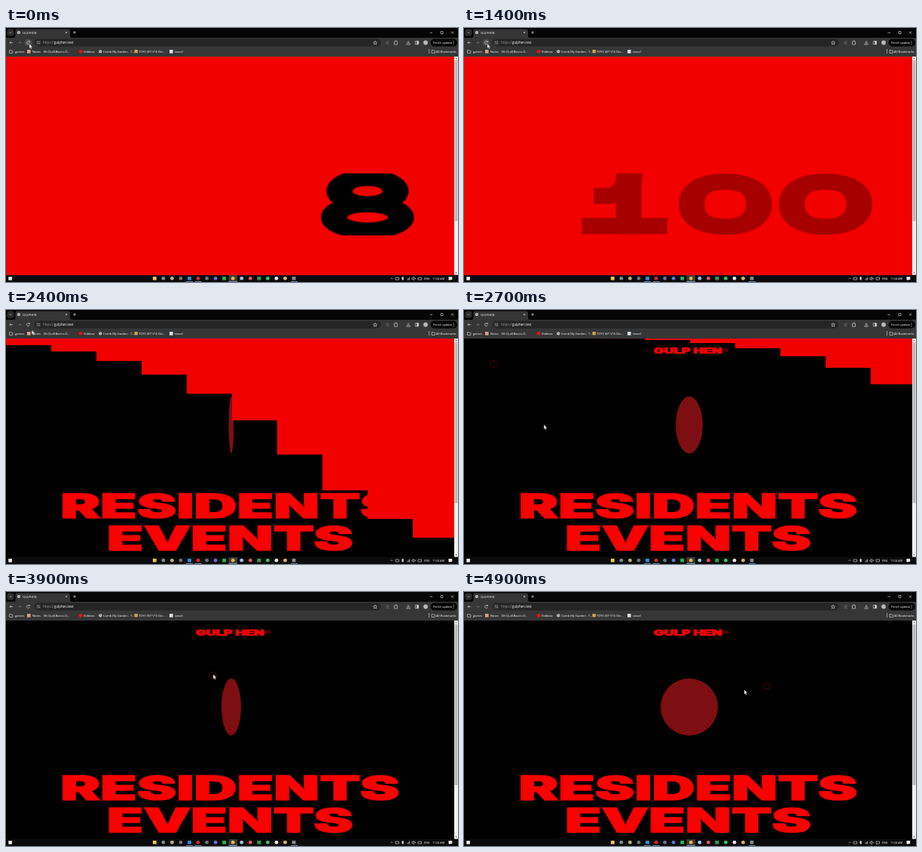
Write an HTML page that moves like this. It is 600 by 338 pixels and loops after 5000 ms.

```html
<!DOCTYPE html>
<html lang="en">
<head>
<meta charset="utf-8">
<title>GULPHEN</title>
<style>
  html, body { margin: 0; width: 100%; height: 100%; overflow: hidden; background: #000; }
  svg { display: block; width: 100vw; height: 100vh; }
  text { font-family: "Open Sans", "Noto Sans", sans-serif; font-size: 4px; fill: #fff; }
  .line { fill: none; stroke: #e4e4e4; stroke-width: .6; }
  .dim { stroke: #777; }

  .display text { font: 900 44.6px Inter, "Open Sans", sans-serif; fill: #fa0000; stroke: #fa0000; stroke-width: 1.2; text-anchor: middle; }
  .display .brand { font-size: 10.2px; stroke-width: .6; }
  .display .mark { font-size: 8px; font-weight: 400; fill: #b00000; stroke: none; }

  #count path { fill: none; stroke: #000; stroke-width: 21.5; clip-path: url(#digit); }

  .loop, #wipe rect { animation: 5s linear infinite both; }
  .cover { animation-name: cover; }
  @keyframes cover { 0%, 34.53% { visibility: visible; } 34.54%, 100% { visibility: hidden; } }

  .counter { animation-name: fade; }
  @keyframes fade {
    0%, 24% { opacity: 1; animation-timing-function: ease-out; }
    32%, 100% { opacity: 0; }
  }

  #wipe rect { animation-name: lift; fill: #f20000; shape-rendering: crispEdges; }
  @keyframes lift {
    0%, 34.54% { transform: scaleY(1); animation-timing-function: cubic-bezier(.5, 0, .3, 1); }
    51.2%, 100% { transform: scaleY(0); }
  }

  .hover { animation-name: hover; }
  @keyframes hover { 0%, 47% { opacity: 1; } 47.1%, 100% { opacity: 0; } }

  .pointer { animation-name: point; animation-timing-function: ease-in-out; }
  @keyframes point {
    0%, 47% { transform: translate(31px, 21px); }
    54% { transform: translate(106px, 152.5px); }
    60% { transform: translate(112px, 160px); }
    70%, 78% { transform: translate(275px, 109.5px); }
    83% { transform: translate(466px, 121px); }
    90% { transform: translate(480px, 130px); }
    98%, 100% { transform: translate(372px, 130px); }
  }

  .ring { animation-name: trail; animation-timing-function: ease-in-out; }
  @keyframes trail {
    0%, 48% { transform: translate(31px, 22px) rotate(40deg) scale(1); }
    54% { transform: translate(39px, 72px) rotate(40deg) scale(1.2, .85); }
    63% { transform: translate(112px, 160px) rotate(0deg) scale(1); }
    73%, 78.5% { transform: translate(275px, 111px) rotate(0deg) scale(1); }
    82% { transform: translate(390px, 118px) rotate(3deg) scale(1.25, .8); }
    91% { transform: translate(484px, 129px) rotate(3deg) scale(1); }
    98%, 100% { transform: translate(402px, 125px) rotate(3deg) scale(1.2, .8); }
  }
</style>
</head>
<body>
<svg viewBox="0 0 600 338" preserveAspectRatio="none">
  <defs>
    <clipPath id="view"><rect y="38" width="595" height="290.6"/></clipPath>
    <clipPath id="digit"><rect y="-1" width="79.5" height="82"/></clipPath>
    <g id="globe"><circle r="2.1" fill="#d8d8d8"/><path d="M-1.3 -1L.3 -.4 -.4 .7M.6 1.2L1.3 -.3" fill="none" stroke="#555" stroke-width=".6"/></g>
  </defs>

  <rect y="328" width="600" height="10" fill="#0b0b0b"/>

  <g clip-path="url(#view)">
    <rect y="38" width="595" height="291"/>
    <ellipse id="badge" cx="299" cy="153" rx="38" ry="38" fill="#7d0e12"/>
    <g class="display">
      <g transform="translate(297.5 0) scale(1.775 1)">
        <text class="brand" y="58">GULP HEN</text>
        <text class="mark" x="28" y="57.4">®</text>
        <text y="276.7">RESIDENTS</text>
        <text y="319.8">EVENTS</text>
      </g>
    </g>
    <circle class="loop ring" r="4.6" fill="none" stroke="#780008" stroke-width=".7"/>
    <g id="wipe" transform="translate(0 38)"></g>
    <rect class="loop cover" y="38" width="595" height="291" fill="#f20000"/>
    <g class="loop counter"><g id="count"></g></g>
  </g>

  <!-- scrollbar -->
  <rect x="595" y="38" width="5" height="290.6" fill="#f1f1f1"/>
  <rect x="595.6" y="43" width="3.8" height="214" fill="#b9b9b9"/>
  <path d="M596.3 41.3L597.5 39.6 598.7 41.3ZM596.3 325L597.5 326.7 598.7 325Z" fill="#666"/>

  <!-- tabs -->
  <rect width="600" height="13" fill="#050505"/>
  <rect x="1.5" y="1.5" width="9" height="9" rx="3" fill="#2e2e2e"/>
  <path d="M10 13Q12.5 13 12.5 10.5V4Q12.5 1.5 15 1.5H82.5Q85 1.5 85 4V10.5Q85 13 87.5 13Z" fill="#363636"/>
  <use href="#globe" x="17" y="6"/>
  <text x="22" y="7.6">GULPHEN</text>
  <path class="line" d="M4.7 5.5L6 6.8 7.3 5.5M79 4.9L81.2 7.1M81.2 4.9L79 7.1M89 6H93M91 4V8M562.5 6.2H566M577 4.6H580V7.6H577ZM591 4.6L594 7.6M594 4.6L591 7.6"/>

  <!-- toolbar -->
  <rect y="13" width="600" height="25" fill="#363636"/>
  <rect x="37.5" y="14.5" width="460" height="10" rx="5" fill="#252525"/>
  <circle class="loop hover" cx="29.5" cy="19.5" r="5" fill="#4c4c4c"/>
  <path class="line" d="M9.2 19.5H5M6.8 17.7L5 19.5 6.8 21.3M31 18.2A2 2 0 1 0 31.4 20.2M31.4 17V18.6H29.8"/>
  <path class="line dim" d="M16 19.5H20M18.3 17.7L20 19.5 18.3 21.3M504.5 18H508.5M504.5 19.6H508.5M504.5 21.2H508.5"/>
  <circle cx="43" cy="19.5" r="3.5" fill="#383838"/>
  <path class="line" d="M41.3 18.5H43M44 18.5H44.8M41.3 20.5H42.1M43.1 20.5H44.8"/>
  <text x="49" y="21.3" style="font-size:4.4px"><tspan fill="#999">https://</tspan>gulphen.test</text>
  <path class="line" d="M490 17.2L490.8 18.9 492.5 19 491.2 20.2 491.6 22 490 21 488.4 22 488.8 20.2 487.5 19 489.2 18.9Z"/>
  <path class="line" d="M515.5 18H517V17H518.4V18H519.5V22H515.5ZM534 17V20.4M532.4 19L534 20.6 535.6 19M531.8 20.6V22H536.2V20.6M543.3 17.5H547.5V21.7H543.3Z"/>
  <path d="M545.4 17.5H547.5V21.7H545.4Z" fill="#ddd"/>
  <circle cx="557" cy="19.5" r="2.9" fill="#b8b8b8"/>
  <rect x="563.5" y="14.5" width="35.5" height="10" rx="5" fill="#050505"/>
  <text x="567" y="21">Finish update</text>
  <g fill="#ddd"><circle cx="594" cy="17.7" r=".5"/><circle cx="594" cy="19.5" r=".5"/><circle cx="594" cy="21.3" r=".5"/></g>

  <!-- bookmarks -->
  <path class="line" d="M4.5 29.5H6.5L7.1 30.2H8.9V33.4H4.5ZM561.5 28V34M565 29.5H567L567.6 30.2H569.4V33.4H565Z"/>
  <rect x="28" y="29" width="4.6" height="4.6" fill="#d9a08a"/>
  <circle cx="99.2" cy="31.3" r="2.4" fill="#e8121c"/>
  <use href="#globe" x="125.3" y="31.3"/>
  <rect x="170.5" y="29" width="4.3" height="4.3" fill="#caa65a"/>
  <rect x="217" y="29" width="4.6" height="4.6" fill="#d6e2ea"/>
  <g id="marks"></g>

  <!-- taskbar -->
  <rect x="295.5" y="329" width="11.5" height="9" fill="#3a3a3a"/>
  <rect x="3.3" y="331" width="4.6" height="4.6" fill="#f2f2f2"/>
  <g id="apps"></g>
  <path d="M239 337.5H248M250.5 337.5H259.5M295.5 337.5H307M378 337.5H387" stroke="#76a9d8" stroke-width=".8"/>
  <path class="line" d="M510.6 334L512 332.6 513.4 334M517 332H521.5V335H517ZM533 335.5V333.5M534.3 335.5V332.5M535.6 335.5V331.5M539 332.5H540L541.4 331.3V335.5L540 334.4H539ZM542.4 332.5L544 334.3M544 332.5L542.4 334.3M547 332H551.5V335H547Z"/>
  <rect x="525.5" y="331" width="2.2" height="4.6" rx="1" fill="#ddd"/>
  <text x="555" y="334.8" style="font-size:3.7px">ENG</text>
  <text x="566" y="334.8" style="font-size:3.7px">11:04 AM</text>
  <path d="M587.5 331H592.2V335H590L588.6 336.2V335H587.5Z" fill="#eee"/>

  <path class="loop pointer" d="M0 0V6.2L1.4 4.9 2.4 7.1 3.4 6.7 2.4 4.5H4.4Z" fill="#fff" stroke="#222" stroke-width=".35"/>
</svg>
<script>
  const LOOP = 5000;
  const $ = id => document.getElementById(id);

  function add(parent, tag, attrs, text = "") {
    const el = document.createElementNS("http://www.w3.org/2000/svg", tag);
    for (const key in attrs) el.setAttribute(key, attrs[key]);
    el.textContent = text;
    parent.append(el);
    return el;
  }

  const marks = {
    12: "games", 35: "Notes", 50: "Mr.Quill.Basics.O...", 103: "Viddora",
    129: "Comb My Garden - T...", 176: "TOYS SET V16 Die...", 224: "tassel", 571: "All Bookmarks"
  };
  for (const x in marks) add($("marks"), "text", { x, y: 32.8 }, marks[x]);

  const colors = ["#f0c64c", "#7f8b8b", "#b9b27c", "#687480", "#2d8fd8", "#d8262c", "#66758a", "#6470d8",
    "#27b355", "#e0b83c", "#9cc3dc", "#e25368", "#2f9e4c", "#37c463", "#e6e6e6", "#d8b45c", "#888"];
  colors.forEach((fill, i) => {
    const x = 197.3 + i * 11.55;
    if (i % 4) add($("apps"), "circle", { cx: x, cy: 333.2, r: 2.4, fill });
    else add($("apps"), "rect", { x: x - 2.4, y: 330.9, width: 4.8, height: 4.6, fill });
  });

  for (let i = 0; i < 10; i++) {
    const column = add($("wipe"), "rect", { x: i * 60, width: 60, height: 291 });
    column.style.animationDelay = i * 55 + "ms";
  }

  // Centre lines of the wide numerals, stroked and clipped to their cell.
  const numerals = [
    "M39 10C58 10 67 22 67 40S58 70 39 70 11 58 11 40 20 10 39 10Z",
    "M3 69H74M42 80V0M13 29H24Q42 29 43 -2",
    "M11 28C12 5 66 5 66 25C66 42 22 50 13 69H76",
    "M10 24C14 5 63 6 63 24Q63 39 28 39Q67 39 67 55C67 75 10 76 9 54",
    "M79 57H4L59 3M56.5 1V80",
    "M71 11H18L14 42C28 33 67 33 67 53C67 75 10 76 8 56",
    "M67 25C60 3 11 4 11 43C11 76 67 76 67 53S24 35 12 50",
    "M0 12H74M66 14C44 28 29 48 26 82",
    "M39 5C8 5 8 40 39 40S70 5 39 5ZM39 40C2 40 2 75 39 75S76 40 39 40Z",
    "M11 55C18 77 67 76 67 37C67 4 11 4 11 27S54 45 66 30"
  ];
  const cells = [0, 1, 2].map(i =>
    add($("count"), "path", { transform: `translate(${417.5 - i * 133} 194.5) scale(1.6 1)` }));

  function showCount(n) {
    const digits = [...String(n)].reverse();
    cells.forEach((cell, i) => cell.setAttribute("d", numerals[digits[i]] ?? ""));
  }

  let start;
  function draw(now) {
    start ??= now;
    const t = (now - start) % LOOP;
    const left = Math.max(0, 1 - t / 1100);
    showCount(Math.round(100 - 92 * left ** 1.25));

    const turn = (t - 4900) / 1000 * 110 * Math.PI / 180;
    $("badge").setAttribute("rx", 38 * Math.abs(Math.cos(turn)));
    requestAnimationFrame(draw);
  }
  requestAnimationFrame(draw);
</script>
</body>
</html>
```
